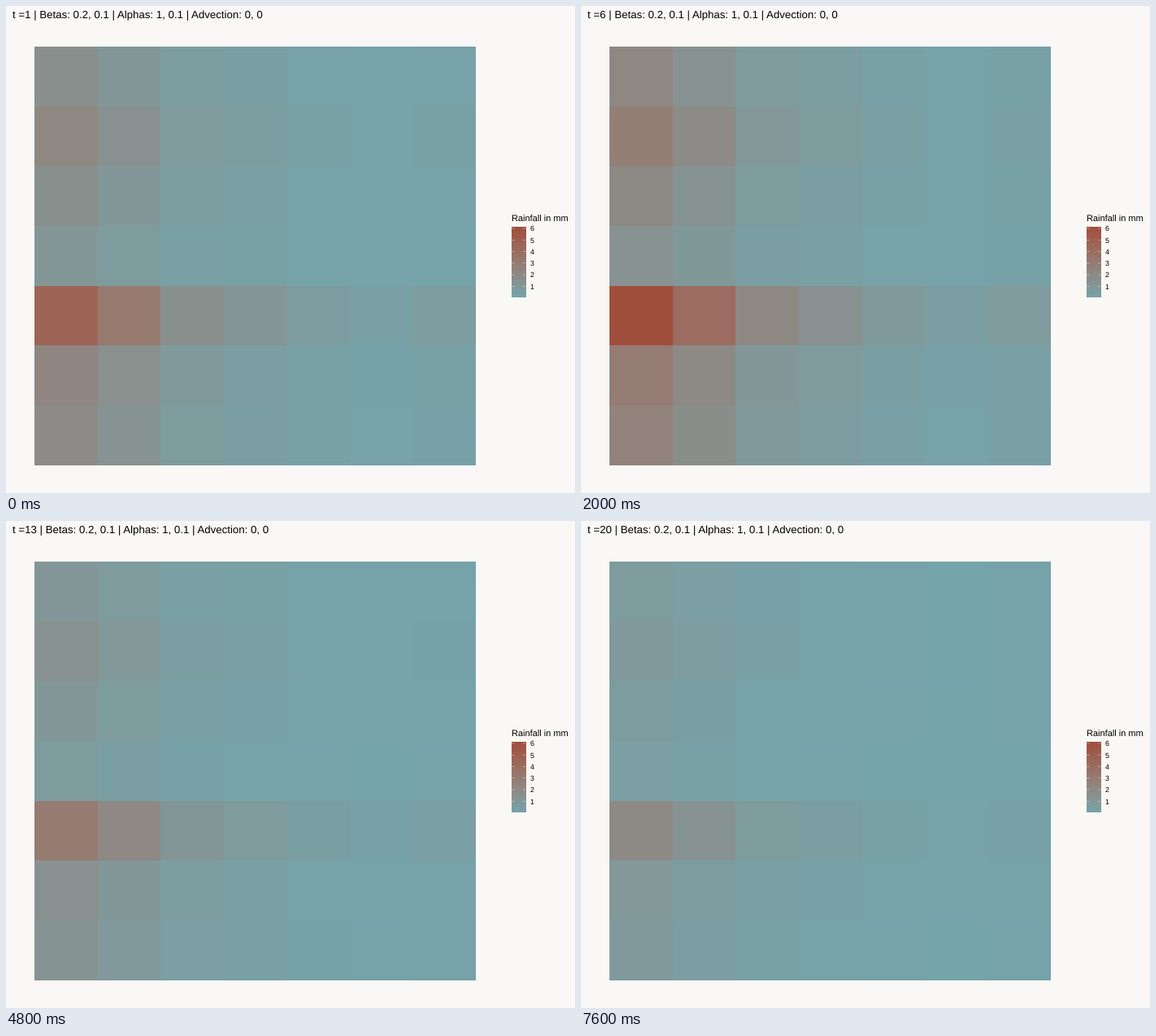
Write a matplotlib script that moves like this. It is 700x600 px and loops after 8 s.

```python
import matplotlib.pyplot as plt
import numpy as np
from matplotlib.animation import FuncAnimation

WIDTH, HEIGHT, DPI = 700, 600, 100
STEP_MS = 400
BACKGROUND = "#faf8f6"
LOW, HIGH = (116, 164, 170), (160, 78, 60)
RAIN_MIN, RAIN_MAX = 0.03, 6.07

# Rainfall is separable: row profile x column profile x intensity over time.
ROWS = [0.34, 0.45, 0.32, 0.22, 1.0, 0.48, 0.41]
COLUMNS = [1.0, 0.67, 0.34, 0.235, 0.13, 0.075, 0.12]
INTENSITY = [0.76, 0.43, 0.39, 0.35, 0.31, 1.0, 0.56, 0.55, 0.55, 0.545,
             0.36, 0.25, 0.50, 0.25, 0.22, 0.20, 0.565, 0.375, 0.34, 0.313]

RGB_TO_XYZ = np.array([[0.4124, 0.3576, 0.1805],
                       [0.2126, 0.7152, 0.0722],
                       [0.0193, 0.1192, 0.9505]])
WHITE = RGB_TO_XYZ.sum(axis=1)

plt.rcParams["font.family"] = "Liberation Sans"
plt.rcParams["text.hinting"] = "none"


def to_lab(rgb):
    c = np.array(rgb) / 255
    linear = np.where(c > 0.04045, ((c + 0.055) / 1.055) ** 2.4, c / 12.92)
    x, y, z = np.cbrt(RGB_TO_XYZ @ linear / WHITE)
    return np.array([116 * y - 16, 500 * (x - y), 200 * (y - z)])


def from_lab(lab):
    lightness, a, b = np.moveaxis(lab, -1, 0)
    y = (lightness + 16) / 116
    xyz = np.stack([y + a / 500, y, y - b / 200], axis=-1) ** 3 * WHITE
    linear = np.clip(xyz @ np.linalg.inv(RGB_TO_XYZ).T, 0, 1)
    return np.where(linear > 0.0031308,
                    1.055 * linear ** (1 / 2.4) - 0.055, 12.92 * linear)


LAB_LOW, LAB_HIGH = to_lab(LOW), to_lab(HIGH)


def rain_color(rain):
    f = np.clip((np.asarray(rain) - RAIN_MIN) / (RAIN_MAX - RAIN_MIN), 0, 1)
    return from_lab(LAB_LOW + f[..., None] * (LAB_HIGH - LAB_LOW))


def label(x, y, text, size):
    return ax.text(x, y, text, fontsize=size * 72 / DPI, color="black",
                   ha="left", va="baseline")


fig = plt.figure(figsize=(WIDTH / DPI, HEIGHT / DPI), dpi=DPI,
                 facecolor=BACKGROUND)
ax = fig.add_axes([0, 0, 1, 1])
ax.axis("off")

pattern = RAIN_MAX * np.outer(ROWS, COLUMNS)
x_edges = np.round(35.3 + 77.6 * np.arange(8))
y_edges = np.round(50 + 73.67 * np.arange(8))
tiles = [ax.add_patch(plt.Rectangle((x0, y0), x1 - x0, y1 - y0,
                                    linewidth=0, antialiased=False))
         for y0, y1 in zip(y_edges, y_edges[1:])
         for x0, x1 in zip(x_edges, x_edges[1:])]

# Colour bar with ticks on both edges.
BAR_LEFT, BAR_RIGHT, BAR_TOP, BAR_BOTTOM = 622, 639.3, 273, 359.2
bar = rain_color(np.linspace(RAIN_MAX, RAIN_MIN, 300))[:, None, :]
ax.imshow(bar, extent=(BAR_LEFT, BAR_RIGHT, BAR_BOTTOM, BAR_TOP),
          aspect="auto", interpolation="nearest")
for value in range(1, 7):
    y = BAR_BOTTOM - (value - RAIN_MIN) / (RAIN_MAX - RAIN_MIN) * (
        BAR_BOTTOM - BAR_TOP)
    for x0, x1 in ((BAR_LEFT, BAR_LEFT + 3.5), (BAR_RIGHT - 3.5, BAR_RIGHT)):
        ax.plot([x0, x1], [y, y], color="white", linewidth=0.375 * 72 / DPI,
                solid_capstyle="butt", snap=False)
    label(644.6, y + 3.2, str(value), 8.8)

label(621.6, 266, "Rainfall in mm", 11)
title = label(8, 15, "", 13.2)

ax.set_xlim(0, WIDTH)
ax.set_ylim(HEIGHT, 0)


def update(frame):
    colors = rain_color(pattern * INTENSITY[frame]).reshape(-1, 3)
    for tile, color in zip(tiles, colors):
        tile.set_facecolor(color)
    title.set_text(f"t ={frame + 1} | Betas: 0.2, 0.1 | "
                   "Alphas: 1, 0.1 | Advection: 0, 0")
    return [*tiles, title]


animation = FuncAnimation(fig, update, frames=len(INTENSITY),
                          interval=STEP_MS, repeat=True, repeat_delay=0)
plt.show()
```
